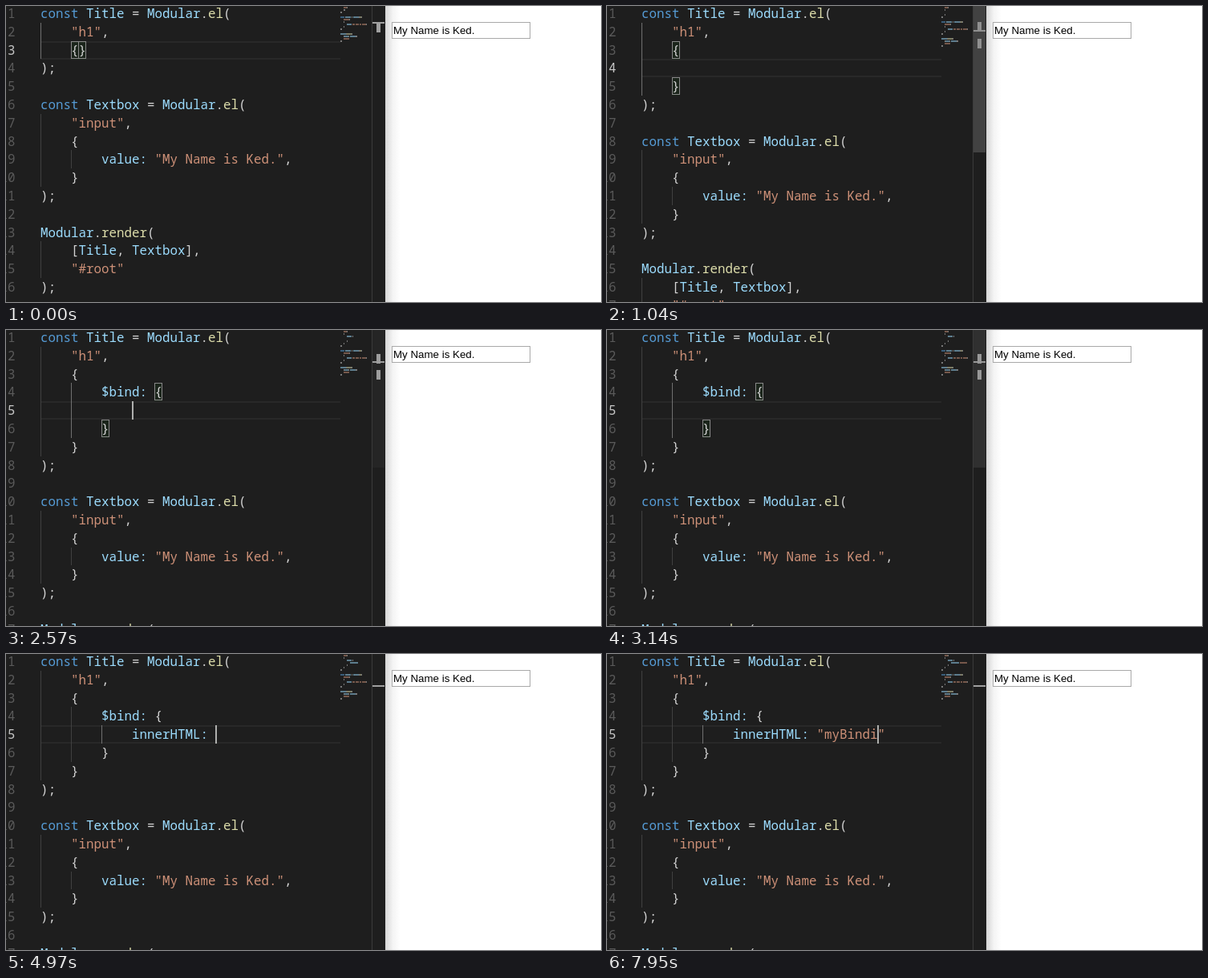
Write an HTML page with a canvas that moves like this. It is 742x370 px and loops after 7990 ms.

```html
<!DOCTYPE html>
<html lang="en">
<head>
<meta charset="utf-8">
<style>
  html, body { margin: 0; width: 100%; height: 100%; overflow: hidden; background: #fff; }
  canvas { display: block; }
</style>
</head>
<body>
<canvas id="stage" width="742" height="370"></canvas>
<script>
const ctx = document.getElementById('stage').getContext('2d');
const LOOP = 7990, LEFT = 43, CHAR = 9.5;
const GREETING = 'My Name is Ked.';
const CODE_FONT = '15.83px "Noto Sans Mono", monospace';
const COLORS = ['#569cd6', '#ce9178', '#dcdcaa', '#9cdcfe', '#d4d4d4'];
const TOKEN = /(\bconst\b)|("[^"]*")|(\b(?:el|render)(?=\())|([\w$]+:?)|(\S)/g;

// Each edit: time, nesting stage, text of the edited line with | as the caret.
const EDITS = [
  [0, 0, '{|}'], [670, 1, '|'], [1440, 1, '$|'], [1690, 1, '$bi|'],
  [1770, 1, '$bin|'], [1900, 1, '$bind|'], [2110, 1, '$bind:|'],
  [2240, 1, '$bind: |'], [2450, 1, '$bind: {|}'], [2530, 2, '|'],
  [3800, 2, 'i|'], [3970, 2, 'in|'], [4050, 2, 'inn|'], [4130, 2, 'inner|'],
  [4420, 2, 'innerH|'], [4500, 2, 'innerHT|'], [4590, 2, 'innerHTM|'],
  [4670, 2, 'innerHTML|'], [4840, 2, 'innerHTML:|'], [4970, 2, 'innerHTML: |'],
  [5720, 2, 'innerHTML: "|"'], [5890, 2, 'innerHTML: "m|"'],
  [6100, 2, 'innerHTML: "my|"'], [6440, 2, 'innerHTML: "myB|"'],
  [6650, 2, 'innerHTML: "myBn|"'], [7070, 2, 'innerHTML: "myB|"'],
  [7580, 2, 'innerHTML: "myBi|"'], [7660, 2, 'innerHTML: "myBin|"'],
  [7870, 2, 'innerHTML: "myBind|"'], [7950, 2, 'innerHTML: "myBindi|"']
];
const CARET_OFF = [[0, 80], [420, 670], [1040, 1360], [2900, 3220],
  [3550, 3800], [5300, 5640], [6990, 7070], [7410, 7580]];
const SLIDER = [[0, 0], [710, .2], [750, .4], [1280, .2], [1360, 0],
  [2570, .08], [2610, .4], [3140, .2], [3220, 0]];
const ERROR_SPAN = [5220, 6310];

const latest = (list, t) => list.filter(item => item[0] <= t).pop();
const within = ([from, to], t) => t >= from && t < to;
const lineTop = row => Math.floor(22.8 * row - 1.6);
const colX = col => LEFT + CHAR * col;

function rect(color, x, y, w, h) {
  ctx.fillStyle = color;
  ctx.fillRect(x, y, w, h);
}

function buildLines(stage, text) {
  const pad = ' '.repeat(4 * (stage + 1));
  let body = [pad + text];
  if (stage > 1) body = ['        $bind: {', ...body, '        }'];
  if (stage > 0) body = ['    {', ...body, '    }'];
  return ['const Title = Modular.el(', '    "h1",', ...body, ');', '',
    'const Textbox = Modular.el(', '    "input",', '    {',
    `        value: "${GREETING}",`, '    }', ');', '',
    'Modular.render(', '    [Title, Textbox],', '    "#root"', ');'];
}

function indents(lines) {
  const own = lines.map(line => line.search(/\S/));
  return own.map((n, i) => n < 0 ? Math.min(own[i - 1], own[i + 1]) : n);
}

function drawGuides(depth, row) {
  const activeCol = depth[row] - 4;
  let first = row, last = row;
  while (depth[first - 1] > activeCol) first--;
  while (depth[last + 1] > activeCol) last++;
  depth.forEach((n, i) => {
    for (let col = 0; col < n; col += 4) {
      const active = col === activeCol && i >= first && i <= last;
      rect(active ? '#707070' : '#404040', colX(col), lineTop(i), 1, lineTop(i + 1) - lineTop(i));
    }
  });
}

function drawLine(line, row, active) {
  const top = lineTop(row);
  ctx.font = CODE_FONT;
  ctx.textAlign = 'right';
  ctx.fillStyle = active ? '#c6c6c6' : '#5a5a5a';
  ctx.fillText(row + 1, 11.5, top + 17);
  ctx.textAlign = 'left';
  for (const match of line.matchAll(TOKEN)) {
    const color = COLORS[match.slice(1).findIndex(Boolean)];
    ctx.fillStyle = color;
    ctx.fillText(match[0], colX(match.index), top + 17);
    ctx.globalAlpha = .5;
    [...match[0]].forEach((c, i) => {
      if (c !== ' ') rect(color, 417 + match.index + i, 3 * row - 2, 1, 2);
    });
    ctx.globalAlpha = 1;
  }
}

function drawBracketBox([row, col]) {
  const x = Math.floor(colX(col)), y = lineTop(row);
  rect('rgba(0,100,0,.1)', x, y, 10, 23);
  ctx.strokeStyle = '#888';
  ctx.lineWidth = 1;
  ctx.strokeRect(x + .5, y + .5, 9, 21);
}

function drawError(row, pitch) {
  const x = colX(8), y = lineTop(row) + 21;
  ctx.strokeStyle = '#f44747';
  ctx.lineWidth = 1;
  ctx.beginPath();
  for (let i = 0; i <= 4; i++) ctx.lineTo(x + i * 2.4, y + (i % 2 ? -1.5 : 1));
  ctx.stroke();
  rect('#c33', 467, pitch * row, 5, 11);
}

function drawPage() {
  rect('#fff', 473, 0, 269, 370);
  const shade = ctx.createLinearGradient(473, 0, 492, 0);
  shade.addColorStop(0, '#d5d5d5');
  shade.addColorStop(.5, '#f4f4f4');
  shade.addColorStop(1, '#fff');
  rect(shade, 473, 0, 19, 370);
  rect('#fff', 481, 20, 173, 21);
  ctx.strokeStyle = '#a9a9a9';
  ctx.lineWidth = 1;
  ctx.strokeRect(481.5, 20.5, 172, 20);
  ctx.font = '13.333px "Liberation Sans", Arial, sans-serif';
  ctx.fillStyle = '#000';
  ctx.fillText(GREETING, 483, 35);
}

function draw(t) {
  const [, stage, marked] = latest(EDITS, t);
  const text = marked.replace('|', '');
  const lines = buildLines(stage, text);
  const row = stage + 2;
  const caretCol = 4 * (stage + 1) + marked.indexOf('|');
  const pitch = 12 - .1 * lines.length;

  rect('#1e1e1e', 0, 0, 473, 370);
  const top = lineTop(row);
  rect('#282828', LEFT, top, 374, 2);
  rect('#282828', LEFT, top + 21, 374, 2);
  drawGuides(indents(lines), row);

  let brackets = [];
  if (marked.endsWith('{|}')) brackets = [[row, caretCol - 1], [row, caretCol]];
  if (!text) brackets = [row - 1, row + 1].map(r => [r, lines[r].length - 1]);
  brackets.forEach(drawBracketBox);
  lines.forEach((line, i) => drawLine(line, i, i === row));

  rect('#3a3a3a', 456, 0, 1, 370);
  brackets.forEach(([r]) => rect('#a0a0a0', 462, Math.round(pitch * r), 5, 12));
  rect('#a0a0a0', 457, Math.round(pitch * row) - 1, 15, 2);
  if (within(ERROR_SPAN, t)) drawError(row + 1, pitch);
  rect(`rgba(121,121,121,${latest(SLIDER, t)[1]})`, 457, 0, 15, stage > 1 ? 172 : 183);

  if (!CARET_OFF.some(span => within(span, t))) {
    rect('#aeafad', Math.floor(colX(caretCol)), top, 2, 23);
  }
  drawPage();
}

const start = performance.now();
function tick() {
  draw((performance.now() - start) % LOOP);
  requestAnimationFrame(tick);
}
tick();
</script>
</body>
</html>
```
